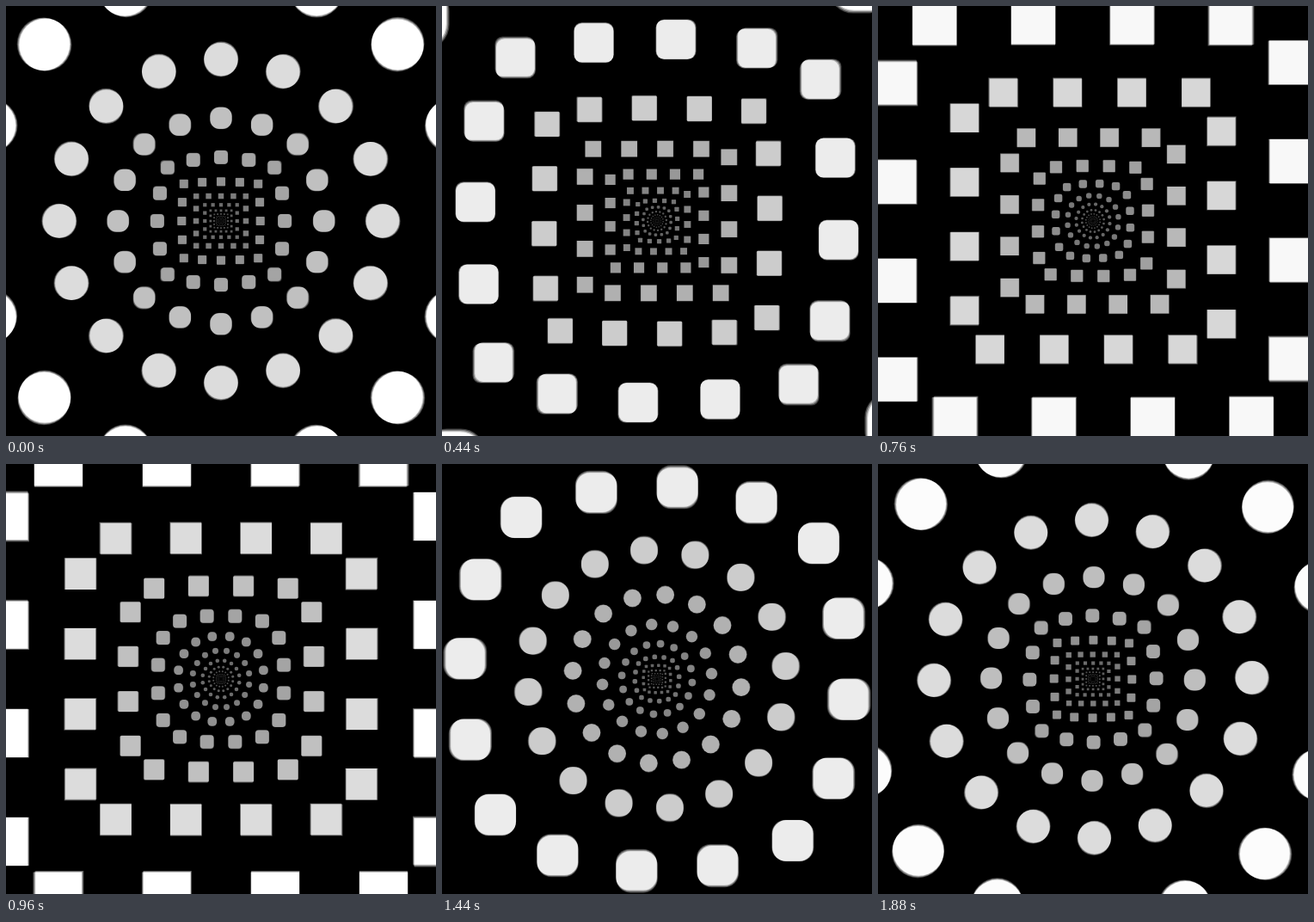
Animation of 500x500 px, one loop 1920 ms. Source, as an HTML page with a canvas:

```html
<!DOCTYPE html>
<html lang="en">
<head>
<meta charset="utf-8">
<title>Circle and square rings</title>
<style>
  html, body { margin: 0; width: 100%; height: 100%; overflow: hidden; background: #000; }
  canvas { display: block; width: 500px; height: 500px; }
</style>
</head>
<body>
<canvas id="stage" width="500" height="500"></canvas>
<script>
const ctx = document.getElementById("stage").getContext("2d");
const LOOP = 1920, STEP = 40;
const DOTS = 16, MID = 250;
const BASE = 188.3, RATIO = 1.542;   // radius of ring 0 and growth per ring
const SIDE = 0.868;                  // half side of the square path per unit radius
const SAMPLES = 4, SHUTTER = 0.6;    // motion blur

const lerp = (a, b, m) => a + (b - a) * m;
const smooth = x => x * x * (3 - 2 * x);

// 0 = circle, 1 = square; a wave that runs outward through the rings
function morph(ring, t) {
  const phase = (10 * t - ring) / 12;
  return smooth((1 + Math.cos(2 * Math.PI * (phase - 0.42))) / 2);
}

// Point on the unit square, p in dot spacings clockwise from the top middle
function onSquare(p) {
  const q = (((p + 2) % DOTS) + DOTS) % DOTS;
  const side = Math.floor(q / 4), along = (q % 4) / 2 - 1;
  return [[along, -1], [1, along], [-along, 1], [-1, -along]][side];
}

function drawRing(ring, t) {
  const r = BASE * RATIO ** (ring + 2 * t);
  const m = morph(ring, t);
  const half = r * lerp(0.1055, 0.097, m);
  const corner = half * (1 - m);
  const spin = ring % 2 ? -t : t;
  const grey = Math.min(255, 255 * Math.cbrt(r / 290));
  const v = Math.round(grey / SAMPLES);

  ctx.fillStyle = `rgb(${v},${v},${v})`;
  for (let i = 0; i < DOTS; i++) {
    const p = i + spin, a = p * 2 * Math.PI / DOTS;
    const [sx, sy] = onSquare(p);
    const x = MID + r * lerp(Math.sin(a), SIDE * sx, m);
    const y = MID + r * lerp(-Math.cos(a), SIDE * sy, m);
    ctx.beginPath();
    ctx.roundRect(x - half, y - half, 2 * half, 2 * half, corner);
    ctx.fill();
  }
}

function draw(ms) {
  const now = Math.floor((ms % LOOP) / STEP) * STEP;
  ctx.globalCompositeOperation = "source-over";
  ctx.fillStyle = "#000";
  ctx.fillRect(0, 0, 500, 500);
  ctx.globalCompositeOperation = "lighter";
  for (let s = 0; s < SAMPLES; s++) {
    const shift = ((s + 0.5) / SAMPLES - 0.5) * SHUTTER * STEP;
    for (let ring = 2; ring >= -12; ring--) drawRing(ring, (now + shift) / LOOP);
  }
}

let start = null;
function tick(ms) {
  if (start === null) start = ms;
  draw(Math.max(0, ms - start));
  requestAnimationFrame(tick);
}
draw(0);
requestAnimationFrame(tick);
</script>
</body>
</html>
```
